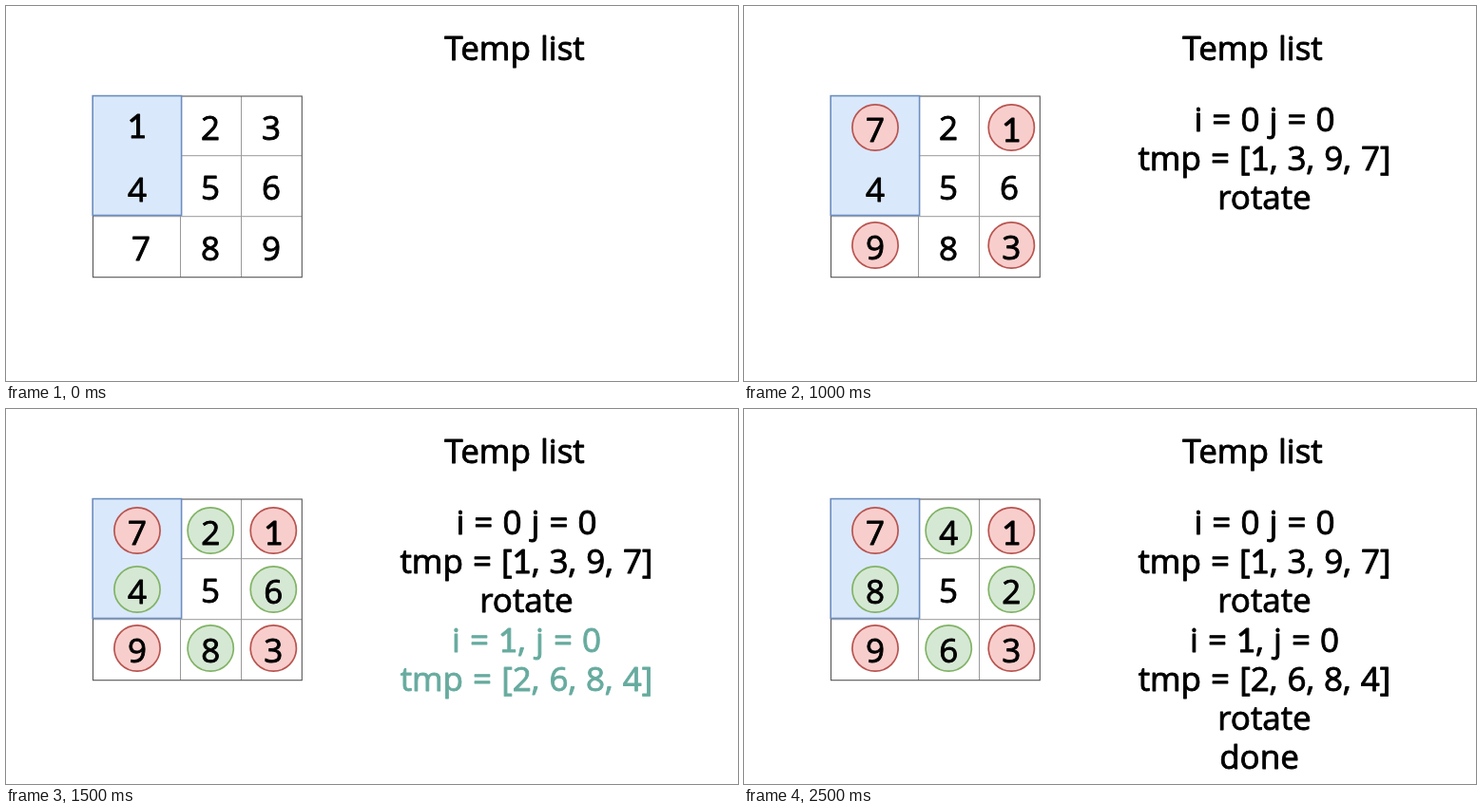
An HTML page that plays this animation: 770 px wide and 395 px high, repeating every 3 s.

```html
<!DOCTYPE html>
<html lang="en">
<head>
<meta charset="utf-8">
<title>Rotate a matrix</title>
<style>
  html, body { margin: 0; width: 100%; height: 100%; overflow: hidden; background: #fff; }
  svg { display: block; }
  text {
    font: 35px "Open Sans", sans-serif;
    word-spacing: 1px;
    text-anchor: middle;
    stroke: currentColor;
    fill: currentColor;
    stroke-width: 0.9;
    stroke-linejoin: round;
  }
  .one { font-family: Lato, sans-serif; }
</style>
</head>
<body>
<svg width="770" height="395" viewBox="0 0 770 395">
  <path d="M91.5 221.7H311M91.5 157.7H311M183.5 95V286M247.5 95V286" fill="none" stroke="#999"/>
  <rect x="91.5" y="95" width="219.8" height="190.7" fill="none" stroke="#555" stroke-width="1.1"/>
  <rect x="91.2" y="94.6" width="93.4" height="125.9" fill="#dae8fc" stroke="#6c8ebf" stroke-width="1.6"/>
  <g id="cells"></g>
  <text x="535" y="57">Temp list</text>
  <g id="scene"></g>
</svg>
<script>
const STEP = 500, STEPS = 6;
const RED = { fill: '#f8cecc', stroke: '#b85450', text: '#ea6b66' };
const GREEN = { fill: '#d5e8d4', stroke: '#82b366', text: '#67ab9f' };
const COLS = [138, 215.2, 281.3], ROWS = [128, 190, 252];
const cells = document.getElementById('cells');
const scene = document.getElementById('scene');

// The digit 1 needs a foot, which the main font lacks.
const label = (string, x, y, color = '#000') =>
  `<text x="${x}" y="${y}" color="${color}">${string.replace(/1/g, '<tspan class="one">1</tspan>')}</text>`;

const disc = (digit, x, y, { fill, stroke }) =>
  `<circle cx="${x}" cy="${y}" r="24.1" fill="${fill}" stroke="${stroke}" stroke-width="1.7"/>` +
  label(digit, x, y + 14.5);

// Clockwise from the top left, or from the top middle.
const corners = (digits, lastX = COLS[0]) =>
  [[COLS[0], ROWS[0]], [COLS[2], ROWS[0]], [COLS[2], ROWS[2]], [lastX, ROWS[2]]]
    .map(([x, y], k) => disc(digits[k], x, y, RED)).join('');
const edges = digits =>
  [[1, 0], [2, 1], [1, 2], [0, 1]]
    .map(([c, r], k) => disc(digits[k], COLS[c], ROWS[r], GREEN)).join('');

function lines(step) {
  const first = step === 1 ? RED.text : '#000';
  const second = step === 3 ? GREEN.text : '#000';
  return [
    [1, step === 1 ? 'i = 0, j = 0' : 'i = 0 j = 0', first],
    [1, 'tmp = [1, 3, 9, 7]', first],
    [2, 'rotate'],
    [3, 'i = 1, j = 0', second],
    [3, 'tmp = [2, 6, 8, 4]', second],
    [4, 'rotate'],
    [5, 'done', '#000', 542]
  ].map(([from, string, color, x = 547.5], k) =>
    step >= from ? label(string, x, 132 + 41.2 * k, color) : '').join('');
}

function draw(step) {
  let html = lines(step);
  if (step === 1) html += corners('1397', 143);
  if (step >= 2) html += corners('7139');
  if (step >= 3) html += edges(step === 3 ? '2684' : '4268');
  scene.innerHTML = html;
}

cells.innerHTML = [
  [138, 139], [215, 141], [279, 141],
  [138, 206], [215, 204], [279, 204],
  [142, 268], [215, 268], [279, 268]
].map(([x, y], k) => label(String(k + 1), x, y)).join('');

let shown = -1;
function tick() {
  const step = Math.floor(performance.now() / STEP) % STEPS;
  if (step !== shown) draw(shown = step);
  requestAnimationFrame(tick);
}
tick();
</script>
</body>
</html>
```
